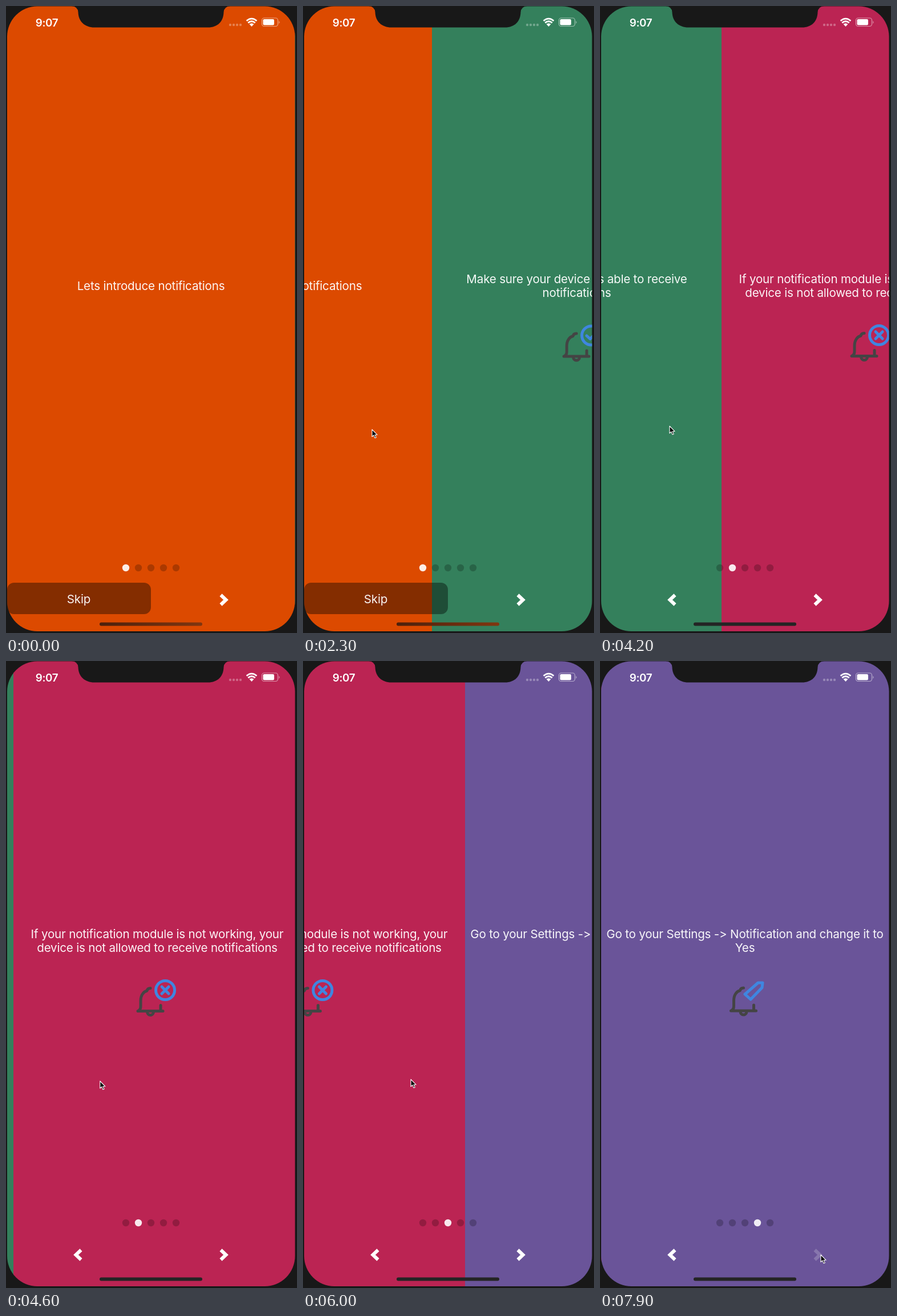
Write an HTML page that moves like this. It is 510x1097 px and loops after 8000 ms.

```html
<!DOCTYPE html>
<html lang="en">
<head>
<meta charset="utf-8">
<title>Onboarding swipe</title>
<style>
  html, body { margin: 0; width: 100%; height: 100%; overflow: hidden; background: #181818; }
  svg { display: block; width: 100vw; height: 100vh; }
  text { font: 20.6px Inter, sans-serif; letter-spacing: -.2px; fill: #fff; fill-opacity: .95;
    text-anchor: middle; font-variant-ligatures: none; font-feature-settings: "calt" 0; }
  #clock { font-size: 18.8px; font-weight: 600; letter-spacing: -.3px; fill-opacity: 1; }
  .bell, .badge { fill: none; stroke: #444; stroke-width: 5; stroke-linecap: round; stroke-linejoin: round; }
  .badge { stroke: #3f86e0; }
  .chevron { fill: none; stroke: #fff; stroke-width: 6; }
</style>
</head>
<body>
<svg viewBox="0 0 510 1097">
  <defs>
    <clipPath id="screen"><rect x="2" y=".5" width="504.5" height="1093.5" rx="53"/></clipPath>
    <linearGradient id="fade"><stop stop-color="#4c200c"/><stop offset="1" stop-color="#803610"/></linearGradient>
  </defs>
  <g clip-path="url(#screen)">
    <g id="pages"></g>
    <rect id="skip" x="2" y="1009" width="252" height="55" rx="12" fill-opacity=".4"/>
  </g>
  <path fill="#181818" d="M115 0Q126 1 126.500 11C127 27 138 37.500 155 37.500H354C371 37.500 381 27 381.500 11Q382 1 393 0Z"/>

  <text id="clock" x="71.500" y="35.500">9:07</text>
  <g fill="#fff">
    <g id="signal" fill-opacity=".3"></g>
    <path d="M430.500 36L426.500 31.800Q430.500 28.600 434.500 31.800Z"/>
    <g fill="none" stroke="#fff" stroke-width="2.800">
      <path d="M424.300 29.500Q430.500 24 436.700 29.500M421.600 26Q430.500 18.200 439.400 26"/>
    </g>
    <rect x="448.500" y="21" width="28" height="14.500" rx="4" fill="none" stroke="#fff" stroke-opacity=".5" stroke-width="1.200"/>
    <rect x="450.500" y="23" width="19.500" height="10.500" rx="2.200"/>
    <path fill-opacity=".5" d="M478.300 26Q481 28.300 478.300 31Z"/>
  </g>

  <g id="dots"></g>
  <text id="skipText" x="127.500" y="1045">Skip</text>
  <path id="back" class="chevron" d="M131.500 1030.500L122.500 1039L131.500 1047.500"/>
  <path id="next" class="chevron" d="M376.500 1030.500L385.500 1039L376.500 1047.500"/>
  <rect id="home" x="164" y="1078.500" width="180" height="6" rx="3"/>
  <path id="cursor" stroke="#fff" stroke-width="1.100" stroke-linejoin="round"
    d="M0 0V12.500L2.900 9.900L5 14.800L7.200 13.900L5.100 9.200H9Z"/>
</svg>
<script>
const LOOP = 8000, STEP = 100, WIDTH = 504;
const $ = id => document.getElementById(id);

const path = (cls, d) => `<path class="${cls}" d="${d}"/>`;
const bigBell = path('bell', 'M223 598H285M223 598Q231 595 231 585V577C231 564 238 556 246 554.500C248 547 260 547 262 554.500C270 556 277 564 277 577V585Q277 595 285 598M247 600C247 609.500 261 609.500 261 600');
const smallBell = path('bell', 'M222 613H266M222 613Q227 611 227 605V595C227 585 232 579 238 577.500Q239 573 244 573M262 603V612M238.500 614C238.500 622 249.500 622 249.500 614');
const ring = '<circle class="badge" cx="270" cy="576.500" r="16.500"/>';
const shift = (x, y, body) => `<g transform="translate(${x} ${y})">${body}</g>`;

const pages = [
  { color: '#dc4a00', lines: ['Lets introduce notifications'], icon: bigBell },
  { color: '#34805c', lines: ['Make sure your device is able to receive', 'notifications'],
    icon: smallBell + ring + path('badge', 'M262 577L268 582.500L278 572.500') },
  { color: '#bb2453', lines: ['If your notification module is not working, your', 'device is not allowed to receive notifications'],
    icon: shift(-2.5, -.5, smallBell + ring + path('badge', 'M264 570.500L276 582.500M276 570.500L264 582.500')) },
  { color: '#6a5499', lines: ['Go to your Settings -&gt; Notification and change it to', 'Yes'],
    icon: shift(7.5, -1, smallBell) + path('badge', 'M277 563H285L284 571.500L264 592L254 583Z') }
];

$('pages').innerHTML = pages.map(({ color, lines, icon }) => {
  const top = lines.length > 1 ? 485.3 : 497.3;
  const label = lines.map((s, i) => `<text x="254" y="${top + i * 24}">${s}</text>`).join('');
  return `<g><rect x="2" width="505" height="1097" fill="${color}"/>${label}<g class="icon">${icon}</g></g>`;
}).join('');

const circles = (n, x, gap, y, r) => Array.from({ length: n }, (_, i) =>
  `<circle cx="${x + i * gap}" cy="${y}" r="${r}"/>`).join('');
$('signal').innerHTML = circles(4, 393, 6, 33, 2.2);
$('dots').innerHTML = circles(5, 210, 22, 983, 6.2);

// Keys are [time, ...values]
const scrollKeys = [
  [1900, 0], [2000, 25], [2300, 280], [2400, 375], [2500, 440], [2600, 478], [2700, 497], [2800, 504],
  [3600, 504], [3800, 545], [4000, 665], [4200, 797], [4300, 880], [4400, 940], [4500, 977], [4600, 997], [4700, 1008],
  [5250, 1008], [5400, 1031], [6000, 1230], [6200, 1318], [6300, 1400], [6400, 1455], [6500, 1490], [6600, 1512]
];
const cursorKeys = [
  [1100, 520, 790], [1700, 372, 739], [1800, 365, 737], [1900, 365, 737], [2400, 60, 742], [2500, 75, 742],
  [2900, 400, 726], [3200, 445, 722], [3600, 428, 722], [3800, 374, 725], [4200, 122, 735], [4300, 80, 738],
  [4500, 100, 737], [5000, 424, 727], [5250, 424, 727], [5400, 399, 727], [6000, 189, 732], [6200, 105, 736],
  [6400, 120, 750], [7200, 387, 1036], [7400, 387, 1039]
];

function sample(keys, t) {
  const i = keys.findIndex(k => k[0] > t);
  if (i < 0) return keys[keys.length - 1].slice(1);
  if (i === 0) return keys[0].slice(1);
  const a = keys[i - 1], b = keys[i], p = (t - a[0]) / (b[0] - a[0]);
  return a.slice(1).map((v, j) => v + (b[j + 1] - v) * p);
}

const show = (id, on) => $(id).style.display = on ? '' : 'none';

function render(now) {
  const t = Math.floor(now % LOOP / STEP) * STEP;
  const [scroll] = sample(scrollKeys, t);
  const [x, y] = sample(cursorKeys, t);
  const current = Math.floor((scroll + 1) / WIDTH);

  [...$('pages').children].forEach((page, i) => {
    const d = i * WIDTH - scroll;
    page.setAttribute('transform', `translate(${d} 0)`);
    page.querySelector('.icon').setAttribute('transform', `translate(${d * .05} 0)`);
  });
  show('pages', true);
  $('pages').querySelector('.icon').style.display = t < 500 ? 'none' : '';

  [...$('dots').children].forEach((dot, i) => {
    dot.setAttribute('fill', i === current ? '#fff' : '#000');
    dot.setAttribute('fill-opacity', i === current ? .9 : .22);
  });
  show('skip', current === 0);
  show('skipText', current === 0);
  show('back', current > 0);
  $('next').style.opacity = t >= 7800 ? .2 : 1;
  $('home').setAttribute('fill', current === 0 ? 'url(#fade)' : '#242424');

  show('cursor', t >= 1100);
  $('cursor').setAttribute('transform', `translate(${x} ${y})`);
}

const start = performance.now();
(function tick() {
  render(performance.now() - start);
  requestAnimationFrame(tick);
})();
</script>
</body>
</html>
```
